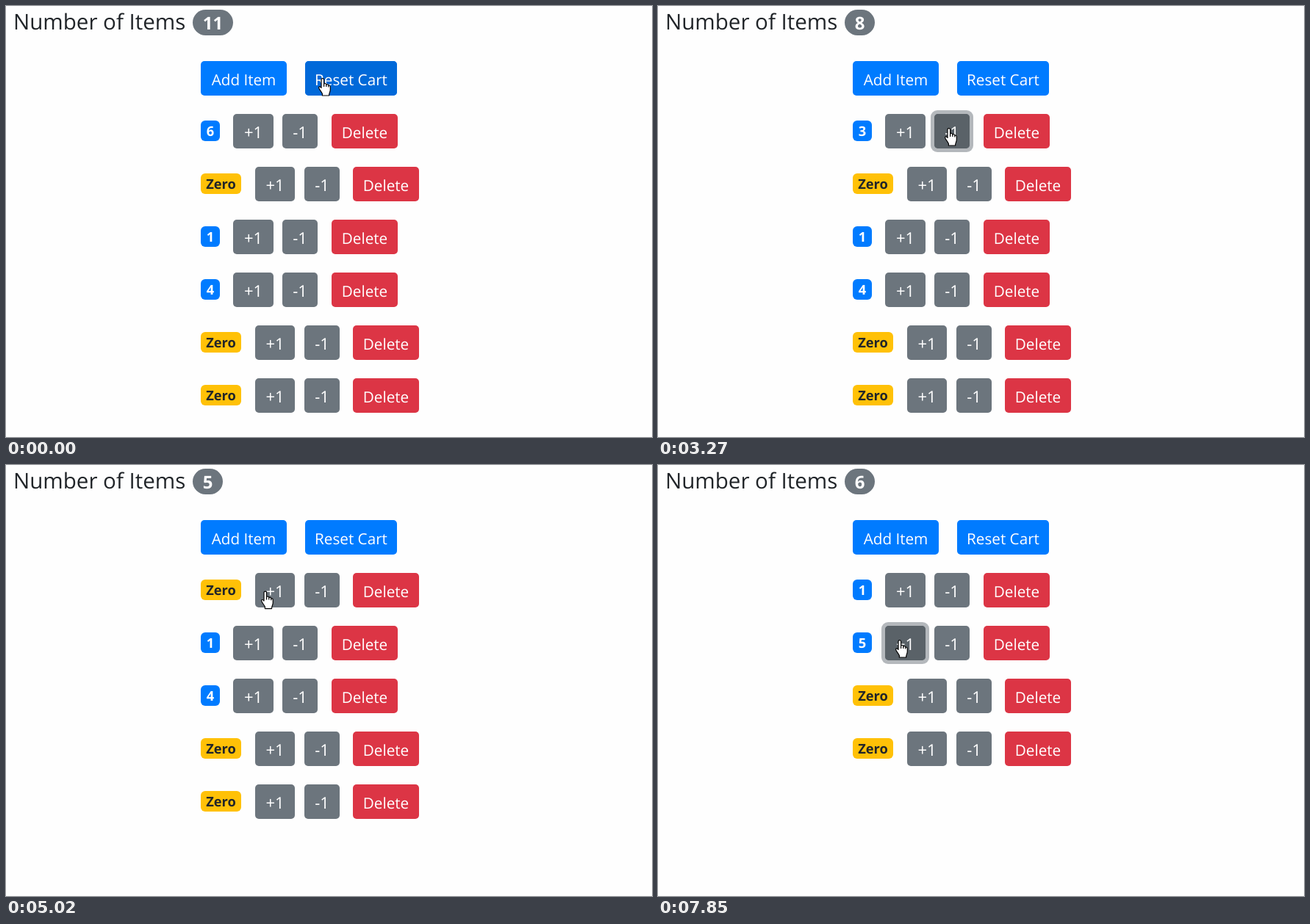
These frames come from a looping animation (879 by 587 pixels, 7990 ms). An HTML page:

```html
<!DOCTYPE html>
<html lang="en">
<head>
<meta charset="utf-8">
<title>Cart counters</title>
<style>
  html, body { margin: 0; width: 100%; height: 100%; overflow: hidden; background: #fefefe; }
  svg { display: block; width: 879px; height: 587px; }
  text { font-family: "Open Sans", "Noto Sans", sans-serif; text-rendering: geometricPrecision; }
</style>
</head>
<body>
<svg id="stage" viewBox="0 0 879 587"></svg>
<script>
const LOOP = 7990;
const INK = '#212529', GREY = '#6c757d', BLUE = '#007bff', RED = '#dc3545';
const DARK = { [BLUE]: '#0069d9', [GREY]: '#5a6268', [RED]: '#c82333' };

// Pointer moves: start, end, x, y, button reached (row number and action)
const moves = [
  [-200, -100, 431, 98, 'reset'],
  [890, 1250, 340, 104, 'add'],
  [1250, 1680, 346, 176, '0+'],
  [1740, 1960, 396, 166, '0-'],
  [3510, 3690, 506, 177],
  [3890, 3980, 500, 176, '0d'],
  [4120, 4320, 434.5, 186, '0-'],
  [4320, 4880, 351, 172],
  [4990, 5110, 356, 171, '0+'],
  [5320, 5810, 341, 170, '0+'],
  [6300, 6600, 480, 172, '0d'],
  [6800, 6950, 455, 167, '0d'],
  [6950, 7620, 329, 238],
  [7780, 7820, 329, 238, '1+']
];
// Each click acts on the button of the current move
const clicks = [2110, 2460, 3270, 3930, 5110, 5400, 5720, 5990, 6130, 6740, 7830];
const PRESS = 50, FADE = 75;

const clamp = v => Math.max(0, Math.min(1, v));
const middle = m => (m[0] + m[1]) / 2;
const moveAt = t => moves.findLast(m => m[0] <= t);

function pointerAt(t) {
  const move = moveAt(t), [start, end, x, y] = move;
  const [, , fromX, fromY] = moves[moves.indexOf(move) - 1] || move;
  const k = Math.sin(clamp((t - start) / (end - start)) * Math.PI / 2);
  return [fromX + (x - fromX) * k, fromY + (y - fromY) * k];
}

function stateAt(t) {
  const cart = [6, 0, 1, 4, 0, 0];
  let focus = null, removedAt = -LOOP;
  for (const click of clicks) {
    if (t < click - PRESS) break;
    focus = moveAt(click)[4];
    if (t < click) break;
    const [row, action] = focus;
    if (action === 'd') {
      cart.splice(row, 1);
      focus = null;
      removedAt = click;
    } else {
      cart[row] += action === '+' ? 1 : -1;
    }
  }
  // A removed row drops the hover until the pointer moves again
  const over = moves.findLast(m => middle(m) <= t);
  const hover = over[0] > removedAt ? over[4] : null;
  return { cart, focus, hover, glow: clamp((t - middle(over)) / FADE) };
}

const rect = (x, y, w, h, r, fill, opacity = 1) =>
  `<rect x="${x}" y="${y}" width="${w}" height="${h}" rx="${r}" fill="${fill}" opacity="${opacity}"/>`;

const text = (s, x, y, size, fill, weight = 400, anchor = 'middle') =>
  `<text x="${x}" y="${y}" font-size="${size}" font-weight="${weight}" fill="${fill}" text-anchor="${anchor}">${s}</text>`;

function button(id, label, x, y, w, color, state, size = 20.7) {
  const focused = id === state.focus;
  const dark = focused ? 1 : id === state.hover ? state.glow : 0;
  return (focused ? rect(x - 5, y - 5, w + 10, 57, 9, color, 0.5) : '') +
    rect(x, y, w, 47, 5, color) +
    (dark ? rect(x, y, w, 47, 5, DARK[color], dark) : '') +
    text(label, x + w / 2, y + 33, size, '#fff');
}

function cartRow(n, i, state) {
  const zero = n === 0, y = 147 + 72 * i, w = zero ? 55 : 26;
  return rect(265, y + 9, w, 28, 6, zero ? '#ffc107' : BLUE) +
    text(zero ? 'Zero' : n, 265 + w / 2, y + 30, 18.3, zero ? INK : '#fff', 700) +
    button(i + '+', '+1', zero ? 339 : 309, y, zero ? 54 : 55, GREY, state, 22) +
    button(i + '-', '-1', zero ? 406 : 376, y, 48, GREY, state, 22) +
    button(i + 'd', 'Delete', zero ? 472 : 443, y, 90, RED, state);
}

function hand([x, y]) {
  return `<g transform="translate(${x} ${y})" stroke="#000" stroke-width="1.2" stroke-linejoin="round">
    <path fill="#fff" d="M-2 2.2C-2 0 1.6 0 1.6 2.2V8C2.6 7 4.8 7.3 4.8 9C6 8.2 7.6 8.7 7.8 10.2
      C9.2 9.7 10.3 10.6 10.3 12V16C10.3 19 8.6 20 8.6 24H-.6V21.5C-2 18.5-4.6 16-5.3 13.6
      C-5.7 11.5-3.6 11.2-2 13.5Z"/>
    <path fill="none" d="M1.6 8V12M4.8 9V12M7.8 10.2V12.6"/></g>`;
}

function draw(t) {
  const state = stateAt(t), { cart } = state;
  const total = cart.reduce((a, b) => a + b);
  const w = total > 9 ? 55 : 41;
  return text('Number of Items', 10, 32, 29.5, INK, 400, 'start') +
    rect(254, 5, w, 35, 17.5, GREY) +
    text(total, 254 + w / 2, 32, 24, '#fff', 700) +
    button('add', 'Add Item', 265, 75, 117, BLUE, state) +
    button('reset', 'Reset Cart', 407, 75, 125, BLUE, state) +
    cart.map((n, i) => cartRow(n, i, state)).join('') +
    hand(pointerAt(t));
}

const stage = document.getElementById('stage');
const begin = performance.now();
function tick() {
  stage.innerHTML = draw((performance.now() - begin) % LOOP);
  requestAnimationFrame(tick);
}
tick();
</script>
</body>
</html>
```
